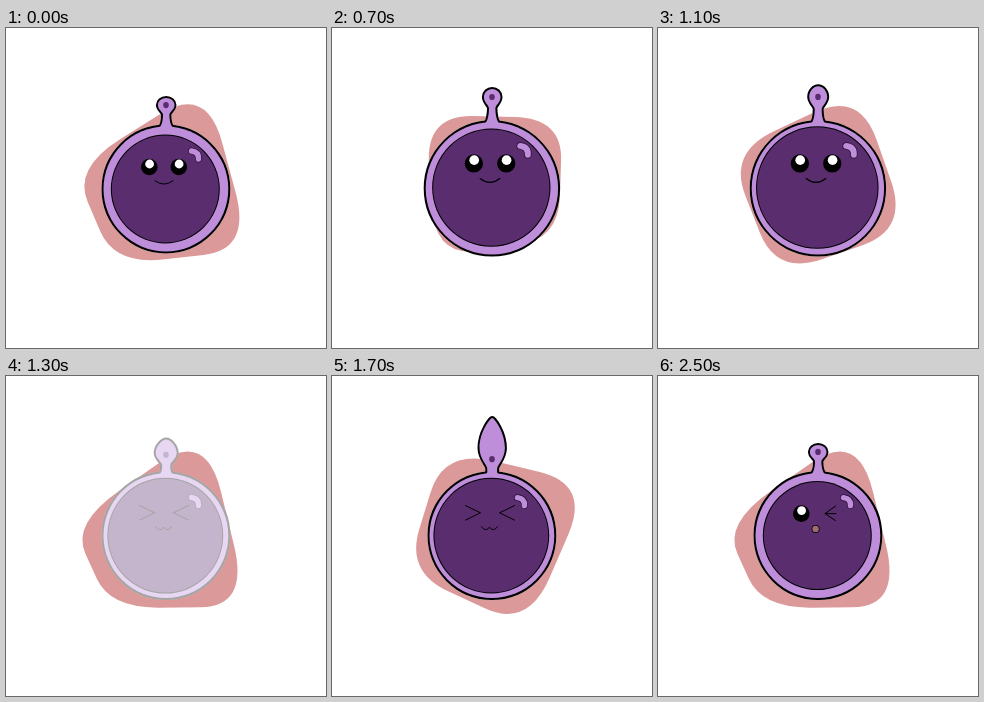
Animation, 320 px wide and 320 px high, one loop 2.6 s. Source, as an HTML page with a canvas:

```html
<!DOCTYPE html>
<html>
<head>
<meta charset="utf-8">
<style>
html, body { margin: 0; width: 100%; height: 100%; overflow: hidden; background: #fff; }
canvas { display: block; }
</style>
</head>
<body>
<canvas id="stage" width="320" height="320"></canvas>
<script>
const SIZE = 320, LOOP = 2600, STEP = 100, MORPH = 400, REST = 62.4;
const RING = '#bf8edb', DARK = '#5a2d6e', PINK = '#dc9999';

const stage = document.getElementById('stage').getContext('2d');
const layer = document.createElement('canvas');
layer.width = layer.height = SIZE;
const ctx = layer.getContext('2d');

// Corners of the three blob poses; each corner moves on to its neighbour's place after a full cycle.
const quads = [
  [[66, 148], [200, 54], [243, 231], [104, 232]],
  [[74, 196], [112, 73], [258, 108], [196, 252]],
  [[133, 262], [75, 101], [203, 72], [257, 172]]
];

// Height of the stalk's tip over time: [ms, y].
const tips = [[0, 70], [400, 72.8], [900, 53], [1300, 63.5], [1700, 42],
  [1800, 42], [1900, 23], [2100, 88], [2400, 69], [LOOP, 69]];

const mix = (a, b, f) => a + (b - a) * f;

function ramp(t, from, to) {
  const f = Math.min(1, Math.max(0, (t - from) / (to - from)));
  return f * f * (3 - 2 * f);
}

const bump = (t, mid, half) => 1 - ramp(Math.abs(t - mid), 0, half);

function tipAt(t) {
  const i = tips.findIndex(k => k[0] > t);
  const [t0, a] = tips[i - 1], [t1, b] = tips[i];
  return mix(a, b, (t - t0) / (t1 - t0));
}

function ellipse(x, y, rx, ry, fill) {
  ctx.beginPath();
  ctx.ellipse(x, y, rx, ry, 0, 0, 7);
  ctx.fillStyle = fill;
  ctx.fill();
}

function line(d, width, color) {
  ctx.lineWidth = width;
  ctx.strokeStyle = color;
  ctx.stroke(new Path2D(d));
}

function drawBlob(t) {
  const phase = (t + 1100) % 1200, k = Math.floor(phase / MORPH);
  const f = ramp(phase % MORPH, 0, MORPH), turn = k === 2 ? 3 : 0;
  const corners = quads[k].map((p, i) => {
    const q = quads[(k + 1) % 3][(i + turn) % 4];
    return [mix(p[0], q[0], f), mix(p[1], q[1], f)];
  });
  const along = (p, q) => [mix(p[0], q[0], .35), mix(p[1], q[1], .35)];
  stage.beginPath();
  corners.forEach((p, i) => {
    stage.lineTo(...along(p, corners[(i + 3) % 4]));
    stage.quadraticCurveTo(...p, ...along(p, corners[(i + 1) % 4]));
  });
  stage.fillStyle = PINK;
  stage.fill();
}

// The stalk goes from a round bulb (leaf = 0) to a pointed leaf (leaf = 1).
function makeStalk(tip, base, leaf) {
  const h = base - tip, x = 160.2;
  const w = (8.3 + 4.4 * leaf) * Math.min(1, h / 25);
  const n = Math.min(w, 3.2 + 1.8 * leaf);
  const mid = tip + h * (.23 + .3 * leaf);
  const neck = base - h * (.45 - .33 * leaf);
  const half = [
    [8, base], [4, base - 2], [n, neck + 4], [n, neck],
    [n, neck - 3], [w, mix(mid, neck, .5)], [w, mid],
    [w, mix(mid, tip, .55)], [w * (.55 - .4 * leaf), tip], [0, tip]
  ];
  const pts = half.map(([dx, y]) => [x - dx, y])
    .concat(half.slice(0, -1).reverse().map(([dx, y]) => [x + dx, y]));
  const path = new Path2D();
  path.moveTo(...pts[0]);
  for (let i = 1; i < pts.length; i += 3)
    path.bezierCurveTo(...pts[i], ...pts[i + 1], ...pts[i + 2]);
  return { path, dotY: mid + .19 * h * leaf * leaf };
}

function silhouette(target, shapes, edge, fill) {
  target.lineWidth = 4;
  target.strokeStyle = edge;
  target.fillStyle = fill;
  shapes.forEach(s => target.stroke(s));
  shapes.forEach(s => target.fill(s));
}

function eye(x) {
  ellipse(x, -22, 8.3, 8.3, '#000');
  ellipse(x + .3, -25, 4.4, 4.4, '#fff');
}

function drawFace(t) {
  const shine = 'M27.5 -38Q35 -37 34.5 -30';
  line(shine, 6.8, '#2a1236');
  line(shine, 5.4, RING);
  if (t < 1300) {
    eye(-14.7);
    eye(14.8);
    line('M-9 -8.3Q0 -1.3 9 -8.3', 1, '#000');
  } else if (t < 1900) {
    line('M-24.5 -30L-9.5 -22.8L-24.5 -15.5M24.5 -30L9.5 -22.8L24.5 -15.5', 1, '#000');
    line('M-8.5 -8.8Q-4.5 -3.3 -.5 -8.3Q3.5 -3.3 7.5 -8.8', 1, '#000');
  } else {
    eye(-14.7);
    line('M19.5 -29.5L9 -22L19.5 -15M9 -22H20', 1, '#000');
    ellipse(-.4, -6.7, 4, 4, '#000');
    ellipse(-.4, -6.7, 3.2, 3.2, '#a06c70');
  }
}

function draw(t) {
  const grow = 7.1 * bump(t, 900, 420) + 2.2 * bump(t, 2100, 350);
  const r = REST + grow, scale = 1 + grow / 39;
  const rim = 8.4 - 3.4 * ramp(t, 400, 1300) * (1 - ramp(t, 2100, 2450));
  const leaf = ramp(t, 900, 1700) * (1 - ramp(t, 2100, 2400));
  const y = 161 - 1.4 * ramp(t, 0, 400), cy = y + .2 * grow;
  const stalk = makeStalk(tipAt(t), cy - r + 2, leaf);
  const disc = new Path2D();
  disc.arc(159.9, cy, r, 0, 7);
  const shapes = [disc, stalk.path];

  ctx.clearRect(0, 0, SIZE, SIZE);
  silhouette(ctx, shapes, '#000', RING);
  ellipse(160, stalk.dotY, 2.8, 3.1, DARK);
  ellipse(159.3, y, r - rim + .5, r - rim + .5, '#000');
  ellipse(159.3, y, r - rim - .5, r - rim - .5, DARK);
  ctx.save();
  ctx.translate(158, y);
  ctx.scale(scale, scale);
  ctx.lineCap = 'round';
  drawFace(t);
  ctx.restore();

  stage.clearRect(0, 0, SIZE, SIZE);
  drawBlob(t);
  // The second mood fades in from white.
  silhouette(stage, shapes, '#fff', '#fff');
  stage.globalAlpha = t < 1300 ? 1 : Math.min(1, .35 + (t - 1300) / 300);
  stage.drawImage(layer, 0, 0);
  stage.globalAlpha = 1;
}

function tick() {
  draw(Math.floor(performance.now() % LOOP / STEP) * STEP);
  requestAnimationFrame(tick);
}
tick();
</script>
</body>
</html>
```
